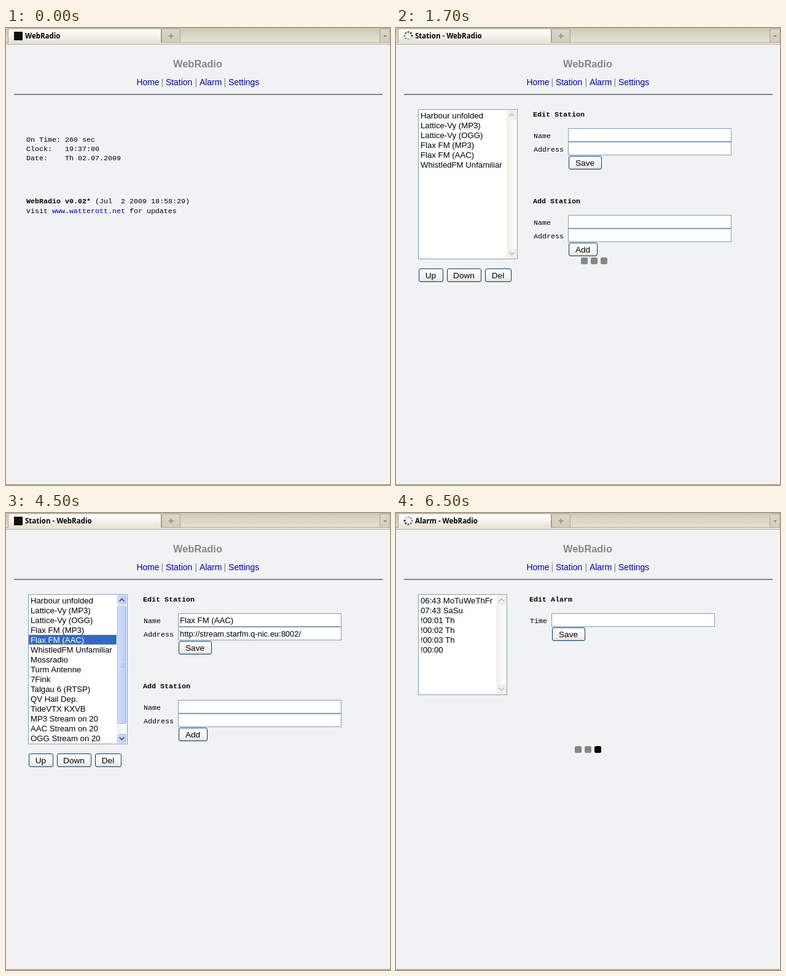
An HTML page that plays this animation: 625x743 px, repeating every 8000 ms.

```html
<!DOCTYPE html>
<html lang="en">
<head>
<meta charset="utf-8">
<title>WebRadio</title>
<style>
html, body { margin: 0; width: 100%; height: 100%; overflow: hidden; background: #f1f2f4; }
svg { display: block; width: 625px; height: 743px; }
text { font: 13.2px "Liberation Sans", Arial, sans-serif; white-space: pre; }
.mono { font: 11.67px "Liberation Mono", "Courier New", monospace; }
.tab { font: bold 11.5px "Noto Sans", "Open Sans", sans-serif; }
.bold { font-weight: bold; }
.head { font-size: 16.4px; font-weight: bold; fill: #868686; }
.nav { font-size: 13.9px; fill: #0000a8; }
.bar { font-size: 14px; fill: #808080; }
.btn { font-size: 13.6px; }
.link { fill: #0000b4; }
.url { font-size: 12.95px; }
.box { fill: #fff; stroke: #7f9db9; }

.scene { visibility: hidden; animation: 8s step-end infinite; }
.home { animation-name: home; }
.station { animation-name: station; }
.loading { animation-name: loading; }
.loaded { animation-name: loaded; }
.picked { animation-name: picked; }
.alarm { animation-name: alarm; }
@keyframes home { 0% { visibility: visible } 6.25%, 100% { visibility: hidden } }
@keyframes station { 0% { visibility: hidden } 6.25% { visibility: visible } 81.25%, 100% { visibility: hidden } }
@keyframes loading { 0% { visibility: hidden } 6.25% { visibility: visible } 31.25%, 100% { visibility: hidden } }
@keyframes loaded { 0% { visibility: hidden } 31.25% { visibility: visible } 81.25%, 100% { visibility: hidden } }
@keyframes picked { 0% { visibility: hidden } 56.25% { visibility: visible } 81.25%, 100% { visibility: hidden } }
@keyframes alarm { 0% { visibility: hidden } 81.25%, 100% { visibility: visible } }
</style>
</head>
<body>
<svg id="stage" viewBox="0 0 625 743" xmlns="http://www.w3.org/2000/svg"></svg>
<script>
const rect = (x, y, w, h, fill, more = '') =>
  `<rect x="${x}" y="${y}" width="${w}" height="${h}" fill="${fill}" ${more}/>`;
const text = (x, y, s, cls = '', more = '') =>
  `<text x="${x}" y="${y}" class="${cls}" ${more}>${s}</text>`;
const mono = (x, y, s, bold) => text(x, y, s, bold ? 'mono bold' : 'mono');
const scene = (name, ...parts) => `<g class="scene ${name}">${parts.join('')}</g>`;
const frame = (x, y, w, h) =>
  `<rect x="${x + .5}" y="${y + .5}" width="${w - 1}" height="${h - 1}" class="box"/>`;
const input = (x, y) => frame(x, y, 266, 22);
const rows = (items, first = 0) =>
  items.map((s, i) => text(40, 147 + 16 * (first + i), s)).join('');

const button = (x, y, w, label) =>
  rect(x + .5, y + .5, w - 1, 21, 'url(#btn)', 'rx="2.5" stroke="#003c74"') +
  text(x + w / 2 - .5, y + 16, label, 'btn', 'text-anchor="middle"');

// A white-edged scrollbar part with a crisp inner outline.
const knob = (x, y, w, h, fill, edge) =>
  rect(x, y, w, h, '#fff', 'rx="2"') +
  rect(x + 1.5, y + 1.5, w - 3, h - 3, fill, `rx="1.5" stroke="${edge}"`);

function arrow(x, y, dir, on) {
  const cx = x + 8.5, cy = y + 8.5;
  const d = `M${cx - 4} ${cy + 2 * dir}l4 ${-4 * dir}l4 ${4 * dir}`;
  return knob(x, y, 17, 17, on ? 'url(#blue)' : '#f2f1ea', on ? '#b4c8f6' : '#e6e4da') +
    `<path d="${d}" fill="none" stroke="${on ? '#4d6185' : '#c6c5b8'}" stroke-width="2"/>`;
}

function scrollbar(x, y, h, on) {
  let s = rect(x, y, 17, h, 'url(#track)') +
    arrow(x, y, 1, on) + arrow(x, y + h - 17, -1, on);
  if (on) {
    s += knob(x, y + 17, 17, 194, 'url(#blue)', '#a6bdf2');
    for (let i = 0; i < 4; i++) {
      s += rect(x + 5, y + 110 + 2 * i, 6, 1, '#eef4fe') +
        rect(x + 6, y + 111 + 2 * i, 6, 1, '#8cb0f8');
    }
  }
  return s;
}

function spinner(lead) {
  let s = '';
  for (let i = 0; i < 8; i++) {
    const a = (lead - i) * Math.PI / 4;
    const v = 60 + 20 * i;
    s += `<circle cx="${(20 + 6 * Math.cos(a)).toFixed(2)}" cy="${(12.5 + 6 * Math.sin(a)).toFixed(2)}"
      r="1.7" fill="rgb(${v},${v + 3},${v + 8})"/>`;
  }
  return s;
}

const dots = (x, y, fills) =>
  fills.map((c, i) => rect(x + 16 * i, y, 11, 11, c, 'rx="2.5"')).join('');

const title = s => text(31, 17, s, 'tab');
const icon = rect(13, 6, 14, 14, '#111');

const grad = (id, dir, ...stops) =>
  `<linearGradient id="${id}" x2="${dir === 'x' ? 1 : 0}" y2="${dir === 'y' ? 1 : 0}">` +
  stops.map(([o, c]) => `<stop offset="${o}" stop-color="${c}"/>`).join('') + '</linearGradient>';

const defs = '<defs>' +
  grad('strip', 'y', [0, '#c9c5b1'], [.3, '#d6d2c0'], [1, '#e5e2d4']) +
  grad('tabFill', 'y', [0, '#ffffff'], [.4, '#f8f7f2'], [1, '#e6e2d3']) +
  grad('side', 'y', [0, '#d9d5c5'], [1, '#d2cebc']) +
  grad('btn', 'y', [0, '#ffffff'], [.8, '#f0efea'], [1, '#d9d4ca']) +
  grad('blue', 'x', [0, '#d0defd'], [.6, '#c4d4fc'], [1, '#b8cbf8']) +
  grad('track', 'x', [0, '#f1f0ea'], [1, '#fdfdfb']) + '</defs>';

const chrome =
  rect(0, 0, 625, 743, '#f1f2f4') +
  rect(0, 0, 625, 23, 'url(#strip)') +
  rect(0, 23, 625, 1, '#aaa696') +
  rect(0, 24, 625, 2, '#ece9dc') +
  rect(0, 26, 625, 1, '#aeaa9a') +
  '<path d="M253.5 23V4q0-2.5 2.5-2.5h25q2.5 0 2.5 2.5V23" fill="url(#side)" stroke="#aaa696"/>' +
  '<path d="M608.5 23V4q0-2.5 2.5-2.5h14V23" fill="url(#side)" stroke="#aaa696"/>' +
  '<path d="M3.5 24V4q0-3 3-3h243q3 0 3 3V24" fill="url(#tabFill)" stroke="#9d998a"/>' +
  rect(4, 23, 248, 2, '#e8e4d6') +
  '<path d="M268.5 9v8M264.5 13h8" stroke="#96937f" stroke-width="2"/>' +
  '<path d="M614 12h6l-3 3z" fill="#858274"/>' +
  rect(0, 741, 625, 1, '#e6e3d6') + rect(0, 742, 625, 1, '#969384') +
  text(312, 64, 'WebRadio', 'head', 'text-anchor="middle"') +
  [[212.5, 'Home'], [260, 'Station'], [315, 'Alarm'], [362, 'Settings']]
    .map(([x, s]) => text(x, 93, s, 'nav')).join('') +
  [252.5, 307.5, 354.5].map(x => text(x, 93, '|', 'bar')).join('') +
  rect(13, 107, 600, 2, '#868686');

const firstRows = ['Harbour unfolded', 'Lattice-Vy (MP3)', 'Lattice-Vy (OGG)',
  'Flax FM (MP3)', 'Flax FM (AAC)', 'WhistledFM Unfamiliar'];
const moreRows = ['Mossradio', 'Turm Antenne', '7Fink', 'Talgau 6 (RTSP)', 'QV Hail Dep.',
  'TideVTX KXVB', 'MP3 Stream on 20', 'AAC Stream on 20', 'OGG Stream on 20'];

const form = (y, name, label, w) =>
  mono(223, y, name, true) + mono(224, y + 35, 'Name') + mono(224, y + 57, 'Address') +
  input(280, y + 19) + input(280, y + 41) + button(281, y + 64, w, label);

document.getElementById('stage').innerHTML = defs + chrome +
  scene('home', icon, title('WebRadio'),
    mono(33, 185, 'On Time: 260 sec'),
    mono(33, 200, 'Clock:   19:37:00'),
    mono(33, 215, 'Date:    Th 02.07.2009'),
    mono(33, 285, 'WebRadio v0.02*', true),
    mono(145, 285, '(Jul  2 2009 18:58:29)'),
    mono(33, 301, 'visit <tspan class="link">www.watterott.net</tspan> for updates')) +
  scene('station', title('Station - WebRadio'),
    frame(36, 132, 162, 244), rows(firstRows),
    button(37, 391, 40, 'Up'), button(83, 391, 56, 'Down'), button(145, 391, 43, 'Del'),
    form(144, 'Edit Station', 'Save', 54), form(285, 'Add Station', 'Add', 47)) +
  scene('loading', spinner(0), scrollbar(180, 133, 242, false),
    dots(301, 373, ['#868686', '#868686', '#868686'])) +
  scene('loaded', icon, scrollbar(180, 133, 242, true), rows(moreRows, firstRows.length)) +
  scene('picked',
    rect(37, 198, 143, 16, '#316ac5'),
    rect(37.5, 198.5, 142, 15, 'none',
      'stroke="#ce953a" stroke-dasharray="1 1" stroke-dashoffset=".5"'),
    text(40, 211, 'Flax FM (AAC)', '', 'fill="#fff"'),
    text(283, 179, 'Flax FM (AAC)'),
    text(283, 201, 'http://stream.starfm.q-nic.eu:8002/', 'url')) +
  scene('alarm', spinner(4), title('Alarm - WebRadio'),
    frame(36, 132, 145, 164), scrollbar(163, 133, 162, false),
    rows(['06:43 MoTuWeThFr', '07:43 SaSu', '!00:01 Th', '!00:02 Th', '!00:03 Th', '!00:00']),
    mono(217, 144, 'Edit Alarm', true), mono(218, 179, 'Time'),
    input(253, 163), button(254, 186, 54, 'Save'),
    dots(291, 379, ['#868686', '#868686', '#000']));
</script>
</body>
</html>
```
